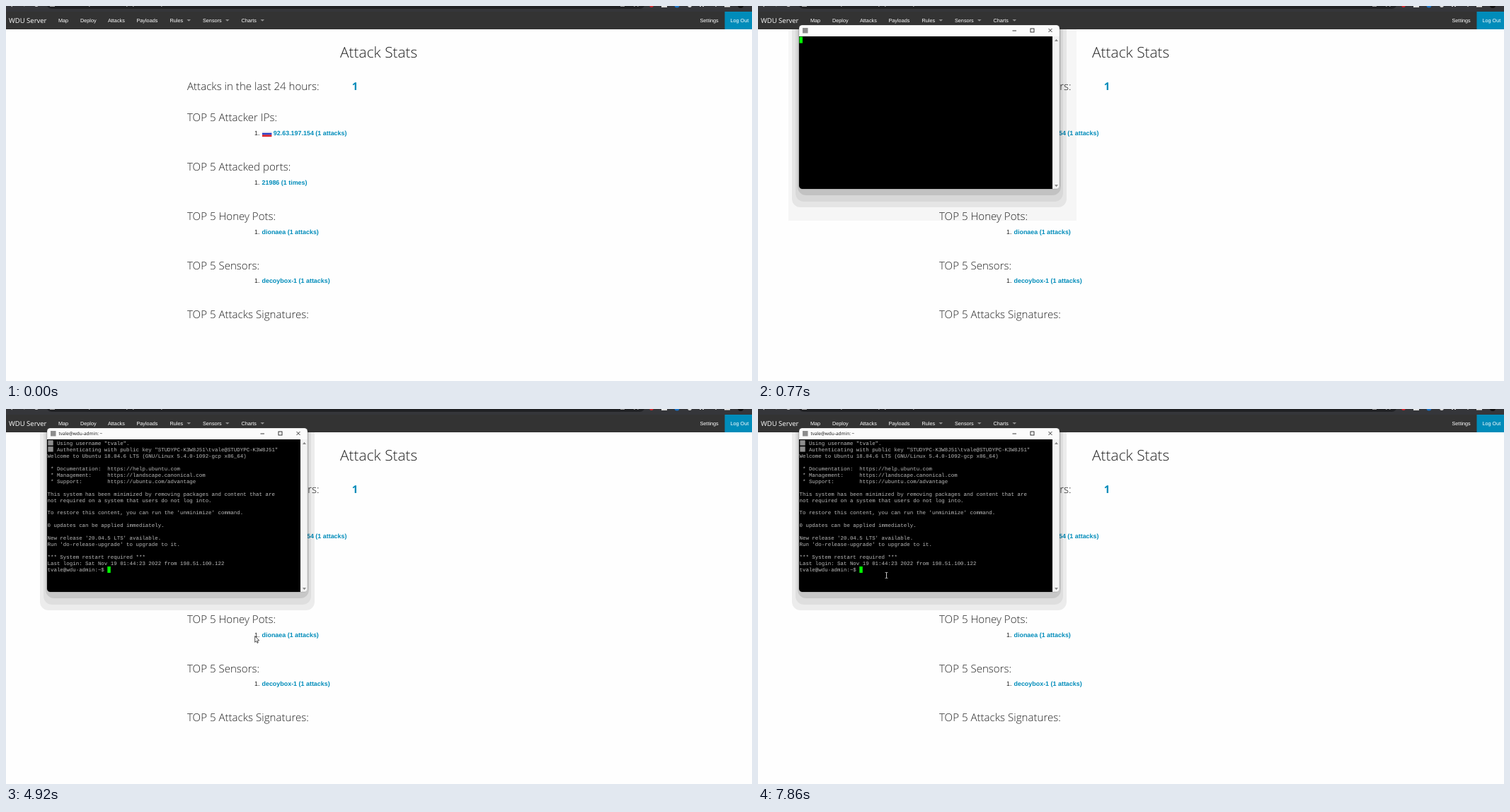
Animation of 1054x531 px, one loop 8 s. Source, as an HTML page with a canvas:

```html
<!DOCTYPE html>
<html lang="en">
<head>
<meta charset="utf-8">
<title>Attack Stats</title>
<style>
  html, body { margin: 0; width: 100%; height: 100%; overflow: hidden; background: #fefefe; }
  canvas { display: block; width: 1054px; height: 531px; }
</style>
</head>
<body>
<canvas id="stage" width="1054" height="531"></canvas>
<script>
const LOOP = 8000;
const SANS = '"Liberation Sans", Arial, sans-serif';
const OPEN = '"Open Sans", sans-serif';
const MONO = '"Liberation Mono", monospace';
const BLUE = '#008cba';
const WIN = { x: 58, y: 27, w: 368, h: 232, bar: 16, scroll: 10 };
const ROW = 8.97, COL = 4.464;

const ctx = document.getElementById('stage').getContext('2d');
ctx.textRendering = 'geometricPrecision';

const PROMPT = 'tvale@wdu-admin:~$ ';
const LOGIN = [
  '   Using username "tvale".',
  '   Authenticating with public key "STUDYPC-K3W8J51\\tvale@STUDYPC-K3W8J51"'
];
const WELCOME = [
  'Welcome to Ubuntu 18.04.6 LTS (GNU/Linux 5.4.0-1092-gcp x86_64)',
  '',
  ' * Documentation:  https://help.ubuntu.com',
  ' * Management:     https://landscape.canonical.com',
  ' * Support:        https://ubuntu.com/advantage',
  '',
  'This system has been minimized by removing packages and content that are',
  'not required on a system that users do not log into.',
  '',
  "To restore this content, you can run the 'unminimize' command.",
  '',
  '0 updates can be applied immediately.',
  '',
  "New release '20.04.5 LTS' available.",
  "Run 'do-release-upgrade' to upgrade to it.",
  '',
  '*** System restart required ***',
  'Last login: Sat Nov 19 01:44:23 2022 from 198.51.100.122',
  PROMPT
];

// Pointer path: time, x, y
const PATH = [
  [960, 990, 361], [1170, 591, 347], [1390, 591, 347], [1490, 588, 345],
  [2240, 588, 345], [2460, 198, 279], [2670, 198, 279], [2880, 169, 236],
  [3100, 169, 236], [3210, 168, 234], [3490, 168, 234], [3510, 168, 232.5],
  [4510, 168, 232.5], [4920, 351, 321], [5300, 464, 363], [5330, 464, 362.5],
  [5480, 464, 362.5], [6090, 469.5, 360.5], [6240, 469.5, 360.5],
  [6900, 169, 185], [7020, 177, 161.5], [7050, 184, 162], [7270, 184, 162],
  [7530, 189, 22], [7860, 181.5, 235.5]
];

function rect(x, y, w, h, color) {
  ctx.fillStyle = color;
  ctx.fillRect(x, y, w, h);
}

function round(x, y, w, h, r, color) {
  ctx.beginPath();
  ctx.roundRect(x, y, w, h, r);
  ctx.fillStyle = color;
  ctx.fill();
}

function text(str, x, y, font, color, align = 'left') {
  ctx.font = font;
  ctx.fillStyle = color;
  ctx.textAlign = align;
  ctx.fillText(str, x, y);
}

function shape(points, fill, stroke, width = 1) {
  ctx.beginPath();
  points.forEach(([x, y]) => ctx.lineTo(x, y));
  ctx.closePath();
  if (fill) { ctx.fillStyle = fill; ctx.fill(); }
  if (stroke) { ctx.strokeStyle = stroke; ctx.lineWidth = width; ctx.stroke(); }
}

function dot(x, y, r, color) {
  ctx.beginPath();
  ctx.arc(x, y, r, 0, Math.PI * 2);
  ctx.fillStyle = color;
  ctx.fill();
}

function line(x1, y1, x2, y2, color, width) {
  ctx.beginPath();
  ctx.moveTo(x1, y1);
  ctx.lineTo(x2, y2);
  ctx.strokeStyle = color;
  ctx.lineWidth = width;
  ctx.stroke();
}

function drawToolbar() {
  rect(0, 0, 1054, 8, '#35363a');
  round(57, -12, 846, 16, 8, '#202124');
  line(6, -1, 9, 1, '#ddd', 1);
  line(25, 0.5, 27, -0.5, '#777', 1);
  dot(43, -2, 3, '#ddd');
  rect(62, 0, 7, 1, '#aaa');
  [117, 170, 179, 219].forEach(x => rect(x, 0, 1.5, 1, '#999'));
  rect(868, 0, 6, 1, '#999');
  rect(887, 0, 1.5, 1, '#999');
  rect(892, 0, 1.5, 1, '#999');
  dot(912, -1, 3, '#d3242b');
  rect(926, 0, 8, 2, '#ddd');
  dot(948, -1, 3.5, '#1a73c8');
  dot(966, -1, 3, '#ddd');
  rect(980, 0, 2, 1, '#ddd');
  rect(984, 0, 2, 1, '#ddd');
  rect(1002, 0, 2, 1, '#aaa');
  rect(1015, 0, 8, 1.5, '#eee');
  dot(1038, -1, 4, '#111');
}

function drawNav() {
  rect(0, 8, 1054, 25, '#333');
  rect(1015.5, 8, 38.5, 25, BLUE);
  text('WDU Server', 4, 24, '9.5px ' + OPEN, '#fff');
  const items = [['Map', 74], ['Deploy', 105], ['Attacks', 144], ['Payloads', 184.5],
    ['Rules', 231.5], ['Sensors', 278], ['Charts', 332.5], ['Settings', 980.5], ['Log Out', 1023.5]];
  items.forEach(([label, x]) => text(label, x, 23, '7.26px ' + SANS, '#fff'));
  [255.5, 310, 359.5].forEach(x =>
    shape([[x, 19], [x + 5.6, 19], [x + 2.8, 21.8]], 'rgba(255,255,255,.45)'));
}

function drawFlag(x, y) {
  ['#f4f4f4', '#2a3ec4', '#d9222a'].forEach((c, i) => rect(x, y + i * 2.7, 13.4, 2.7, c));
}

function drawStats() {
  const heading = '300 15.1px ' + OPEN;
  const entryFont = '8.94px ' + SANS;
  text('Attack Stats', 526.7, 73, '300 20.9px ' + OPEN, '#222', 'center');
  text('Attacks in the last 24 hours:', 256, 119, heading, '#222');
  text('1', 488.7, 119, 'bold 15.1px ' + OPEN, BLUE);
  const groups = [
    ['TOP 5 Attacker IPs:', '92.63.197.154 (1 attacks)'],
    ['TOP 5 Attacked ports:', '21986 (1 times)'],
    ['TOP 5 Honey Pots:', 'dionaea (1 attacks)'],
    ['TOP 5 Sensors:', 'decoybox-1 (1 attacks)'],
    ['TOP 5 Attacks Signatures:']
  ];
  groups.forEach(([title, entry], i) => {
    const y = 163.4 + i * 69.74;
    text(title, 256, Math.round(y), heading, '#222');
    if (!entry) return;
    const base = Math.round(y + 19.7);
    text('1.', 351, base, entryFont, '#222');
    text(entry, i ? 361.5 : 377.8, base, 'bold ' + entryFont, BLUE);
  });
  drawFlag(362, 177);
}

// Stepped shadow: spread to the sides, drop below the window, opacity
function drawShadow(opening) {
  const { x, y, w, h } = WIN;
  if (opening) rect(x - 15, y + 6, w + 39, h + 39, 'rgba(0,0,0,.03)');
  [[10, 26, 0.07], [5, 18, 0.06], [2, 9, 0.1]].forEach(([side, drop, alpha]) =>
    round(x - side, y + 6, w + side * 2, h + drop - 6, [0, 0, 12, 12], `rgba(0,0,0,${alpha})`));
}

function drawFrame(t) {
  const { x, y, w, h, bar, scroll } = WIN;
  drawShadow(t < 960);
  round(x, y, w, h, 4.5, '#fbfbfb');
  ctx.save();
  ctx.clip();
  rect(x, y + bar, w - scroll, h - bar, '#000');
  rect(x + w - scroll, y + bar, scroll, h - bar, '#f4f4f4');
  ctx.restore();

  rect(x + 5, y + 4, 7.5, 7.5, '#8d8d8d');
  line(359.5, 35, 365, 35, '#222', 0.9);
  ctx.strokeRect(385, 32, 5, 5);
  line(410.5, 32, 415.5, 37, '#222', 0.9);
  line(415.5, 32, 410.5, 37, '#222', 0.9);
  shape([[419, 50], [424, 50], [421.5, 46.8]], '#8a8a8a');
  shape([[419, 253], [424, 253], [421.5, 256.2]], '#8a8a8a');
  ctx.beginPath();
  ctx.roundRect(x, y, w, h, 4.5);
  ctx.strokeStyle = 'rgba(0,0,0,.25)';
  ctx.lineWidth = 0.6;
  ctx.stroke();
  if (t >= 960) text('tvale@wdu-admin: ~', 74.5, 37.4, '6.5px ' + OPEN, '#111');
}

function drawTerminal(t) {
  const left = WIN.x + 0.5, top = WIN.y + WIN.bar;
  const lines = t < 960 ? [] : t < 1080 ? LOGIN : LOGIN.concat(WELCOME);
  lines.forEach((str, i) => {
    text(str, left, top + 7.8 + i * ROW, '7.44px ' + MONO, '#bbb');
    if (i < 2) rect(left + 0.8, top + 1.2 + i * ROW, 7.4, 7.4, '#8d8d8d');
  });
  const ready = lines.length > 2;
  const row = ready ? lines.length - 1 : lines.length;
  rect(left + (ready ? PROMPT.length * COL : 0), top + 0.6 + row * ROW, COL, ROW, '#0f0');
}

function drawWindow(t) {
  if (t < 500) return;
  const p = Math.min(1, (t - 480) / 290);
  const scale = 1 - 0.143 * (1 - p) ** 3;
  const cx = 205, cy = 130;
  ctx.save();
  ctx.globalAlpha = Math.min(1, p / 0.3);
  ctx.translate(cx, cy);
  ctx.scale(scale, scale);
  ctx.translate(-cx, -cy);
  drawFrame(t);
  drawTerminal(t);
  ctx.restore();
}

function pointerAt(t) {
  const i = PATH.findIndex(k => k[0] > t);
  if (i < 0) return PATH[PATH.length - 1].slice(1);
  const [t0, x0, y0] = PATH[i - 1], [t1, x1, y1] = PATH[i];
  const p = (t - t0) / (t1 - t0);
  return [x0 + (x1 - x0) * p, y0 + (y1 - y0) * p];
}

function drawPointer(t) {
  if (t < PATH[0][0]) return;
  const [x, y] = pointerAt(t);
  const inTerminal = x > 58 && x < 416 && y > 43 && y < 259;
  ctx.save();
  ctx.translate(x, y);
  if (inTerminal) {
    line(0, -4, 0, 4, '#ddd', 0.9);
    line(-2, -4, 2, -4, '#bbb', 0.8);
    line(-2, 4, 2, 4, '#bbb', 0.8);
  } else {
    shape([[0.4, 0.5], [0.4, 9.2], [2.4, 7.4], [3.7, 10.3], [5, 9.7], [3.8, 6.9], [6.4, 6.7]],
      '#fff', '#222', 0.8);
  }
  ctx.restore();
}

function draw(t) {
  rect(0, 0, 1054, 531, '#fefefe');
  drawToolbar();
  drawNav();
  drawStats();
  drawWindow(t);
  drawPointer(t);
}

const start = performance.now();
function tick() {
  draw((performance.now() - start) % LOOP);
  requestAnimationFrame(tick);
}
tick();
</script>
</body>
</html>
```
